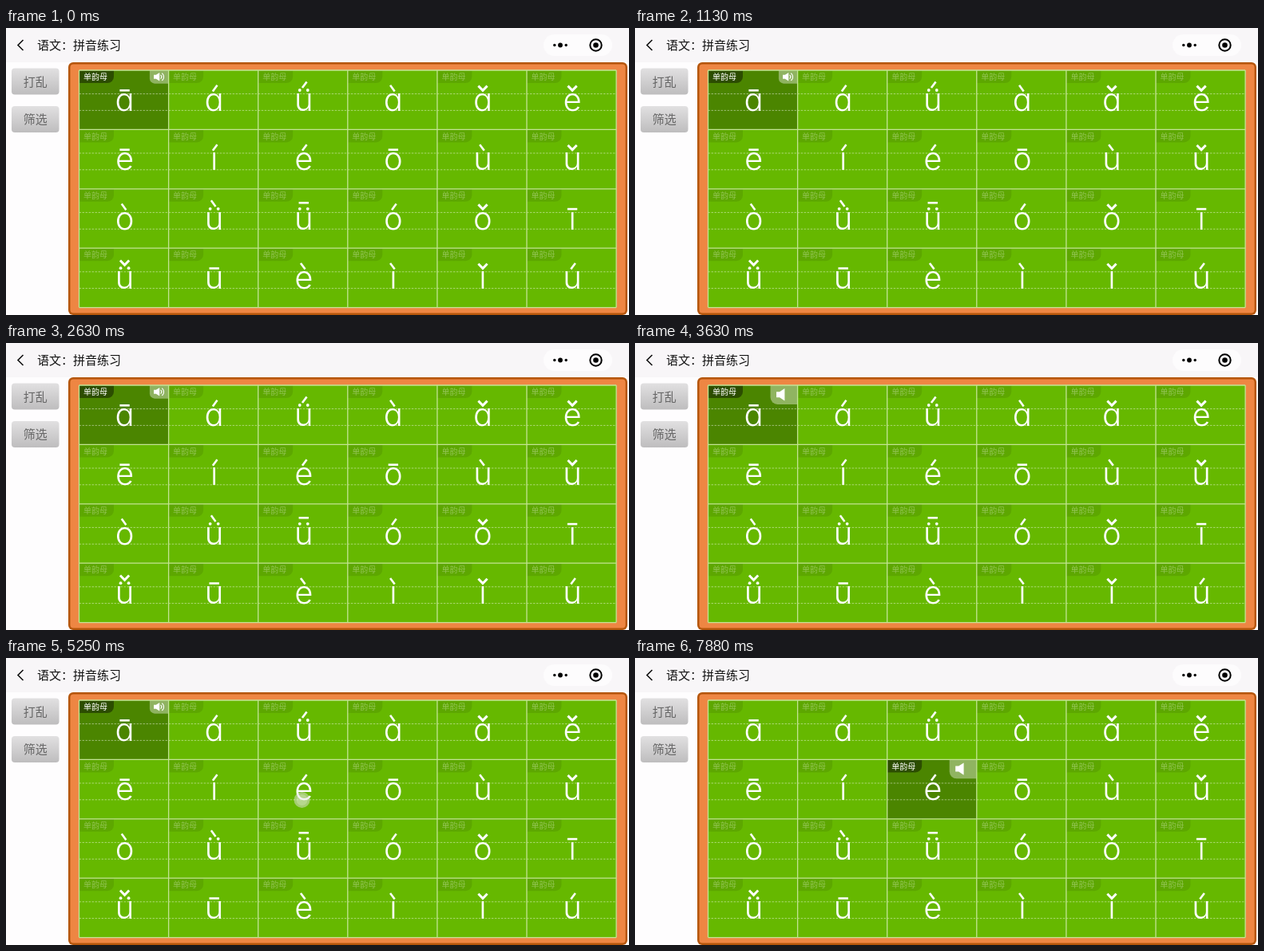
Write an HTML page with a canvas that moves like this. It is 780 px wide and 360 px high and loops after 8000 ms.

```html
<!DOCTYPE html>
<html lang="zh">
<head>
<meta charset="utf-8">
<title>拼音练习</title>
<style>
html, body { margin: 0; width: 100%; height: 100%; overflow: hidden; background: #fff; }
canvas { display: block; width: 780px; height: 360px; }
</style>
</head>
<body>
<canvas id="stage" width="780" height="360"></canvas>
<script>
const ctx = document.getElementById('stage').getContext('2d');
const LOOP = 8000;
const LEFT = 91.5, TOP = 53, CELL_W = 112.1, CELL_H = 74.4, COLS = 6, ROWS = 4;
const CJK = '"Noto Sans CJK SC", "Noto Sans CJK", sans-serif';

// base letter + tone number; v stands for ü
const SYLLABLES = 'ɑ1 ɑ2 v2 ɑ4 ɑ3 e3 e1 i2 e2 o1 u4 u3 o4 v4 v1 o2 o3 i1 v3 u1 e4 i4 i3 u2'.split(' ');
const BASE = { v: 'u', i: 'ı' };
const TONES = {
  1: [[-6.2, 0], [6.2, 0]],
  2: [[-1.8, 3.6], [3.8, -4]],
  3: [[-5.6, -3.2], [0, 2.6], [5.6, -3.2]],
  4: [[-3.8, -4], [1.8, 3.6]]
};

const SELECT_AT = 5500;
const TOUCH = { from: 5130, to: 5500, x: 370.5, y: 178 };
const PLAYS = [[2730, 4700], [5750, LOOP]];
const WAVE_STEP = 300, WAVE_PHASE = 2730 % 900, WAVE_PHASE_2 = 7850 % 900;

function box(x, y, w, h, radii, fill) {
  ctx.beginPath();
  ctx.roundRect(x, y, w, h, radii);
  ctx.fillStyle = fill;
  ctx.fill();
}

function line(points, color, width) {
  ctx.beginPath();
  points.forEach(([x, y]) => ctx.lineTo(x, y));
  ctx.strokeStyle = color;
  ctx.lineWidth = width;
  ctx.stroke();
}

function disc(x, y, r, fill) {
  ctx.beginPath();
  ctx.arc(x, y, r, 0, Math.PI * 2);
  ctx.fillStyle = fill;
  ctx.fill();
}

function label(text, x, y, font, color, align = 'left') {
  ctx.font = font;
  ctx.textAlign = align;
  ctx.fillStyle = color;
  ctx.fillText(text, x, y);
}

function drawHeader() {
  box(0, 0, 780, 43, 0, '#f8f6f8');
  line([[21.5, 15], [15, 21.5], [21.5, 28]], '#111', 1.6);
  label('语文：拼音练习', 39, 27.2, '15px ' + CJK, '#111');
  box(673, 8, 86, 27, 13.5, '#fdfcfd');
  disc(686.8, 21.5, 1.7, '#000');
  disc(694, 21.5, 2.9, '#000');
  disc(701.2, 21.5, 1.7, '#000');
  ctx.beginPath();
  ctx.arc(738.5, 21.5, 7.2, 0, Math.PI * 2);
  ctx.lineWidth = 2;
  ctx.strokeStyle = '#000';
  ctx.stroke();
  disc(738.5, 21.5, 3.3, '#000');
}

function drawButton(text, y) {
  const shade = ctx.createLinearGradient(0, y, 0, y + 33);
  shade.addColorStop(0, '#e1e0e1');
  shade.addColorStop(1, '#bebdbe');
  box(7, y, 59.5, 33, 4, shade);
  label(text, 36.8, y + 22, '15px ' + CJK, '#666', 'center');
}

function drawBoard() {
  box(78, 43, 700, 317, 6, '#b5560c');
  box(80.5, 45.5, 695, 312, 4, '#ee8643');
  box(LEFT, TOP, CELL_W * COLS, CELL_H * ROWS, 0, '#66b800');
}

function drawGrid() {
  const color = '#c3e494', right = LEFT + CELL_W * COLS, bottom = TOP + CELL_H * ROWS;
  for (let c = 0; c <= COLS; c++) {
    const x = LEFT + c * CELL_W;
    line([[x, TOP], [x, bottom]], color, 1.3);
  }
  for (let r = 0; r <= ROWS; r++) {
    const y = TOP + r * CELL_H;
    line([[LEFT, y], [right, y]], color, 1.3);
  }
}

function drawSyllable(code, cx, top) {
  const [key, tone] = code;
  const umlaut = key === 'v';
  label(BASE[key] || key, cx, top + 51, '300 40px Inter, "DejaVu Sans", sans-serif', '#fff', 'center');
  if (umlaut) {
    disc(cx - 5, top + 25, 1.9, '#fff');
    disc(cx + 5, top + 25, 1.9, '#fff');
  }
  const rise = umlaut ? (tone === '1' ? 17.5 : 18.5) : (tone === '1' ? 25.3 : 22.8);
  const shape = TONES[tone].map(([x, y]) => [cx + x, top + rise + y]);
  line(shape, '#fff', tone === '3' ? 3 : 2.6);
}

function drawCell(i, selected) {
  const x = LEFT + (i % COLS) * CELL_W, y = TOP + Math.floor(i / COLS) * CELL_H;
  if (selected) box(x, y, CELL_W, CELL_H, 0, '#4b8500');
  box(x, y, 43.5, 16, [0, 0, 8, 0], selected ? 'rgba(0,0,0,.42)' : 'rgba(0,0,0,.09)');
  label('单韵母', x + 5.5, y + 12.2, '10px ' + CJK, selected ? '#fff' : 'rgba(255,255,255,.32)');
  ctx.setLineDash([2.5, 1.5]);
  for (const dy of [29.6, 50.4]) {
    line([[x, y + dy], [x + CELL_W, y + dy]], 'rgba(255,255,255,.5)', 0.9);
  }
  ctx.setLineDash([]);
  drawSyllable(SYLLABLES[i], x + CELL_W / 2 + 1, y);
}

function drawSpeaker(i, scale, waves) {
  ctx.save();
  ctx.translate(LEFT + (i % COLS + 1) * CELL_W - 0.6, TOP + Math.floor(i / COLS) * CELL_H + 0.6);
  ctx.scale(scale, scale);
  box(-33.5, 0, 33.5, 23.3, [0, 0, 0, 9], 'rgba(255,255,255,.38)');
  ctx.beginPath();
  [[-26, 7.6], [-22, 7.6], [-15.6, 3.4], [-15.6, 18.8], [-22, 14.6], [-26, 14.6]]
    .forEach(([x, y]) => ctx.lineTo(x, y));
  ctx.fillStyle = '#fff';
  ctx.fill();
  ctx.strokeStyle = '#fff';
  ctx.lineWidth = 1.6;
  for (let n = 0; n < waves; n++) {
    ctx.beginPath();
    ctx.arc(-16.2, 11.1, 4.3 + n * 4, -0.95, 0.95);
    ctx.stroke();
  }
  ctx.restore();
}

function draw(t) {
  const selected = t < SELECT_AT ? 0 : 8;
  const playing = PLAYS.some(([from, to]) => t >= from && t < to);
  const phase = selected ? WAVE_PHASE_2 : WAVE_PHASE;
  const waves = playing ? Math.floor((t - phase + 900) / WAVE_STEP) % 3 : 2;

  box(0, 0, 780, 360, 0, '#fefdfe');
  drawHeader();
  drawButton('打乱', 50.5);
  drawButton('筛选', 98);
  drawBoard();
  SYLLABLES.forEach((_, i) => drawCell(i, i === selected));
  drawGrid();
  drawSpeaker(selected, playing ? 1 : 0.69, waves);
  if (t >= TOUCH.from && t < TOUCH.to) {
    disc(TOUCH.x, TOUCH.y, 10, 'rgba(225,225,225,.5)');
    disc(TOUCH.x, TOUCH.y, 7, 'rgba(255,255,255,.2)');
  }
}

const start = performance.now();
function tick() {
  draw((performance.now() - start) % LOOP);
  requestAnimationFrame(tick);
}
tick();
</script>
</body>
</html>
```
